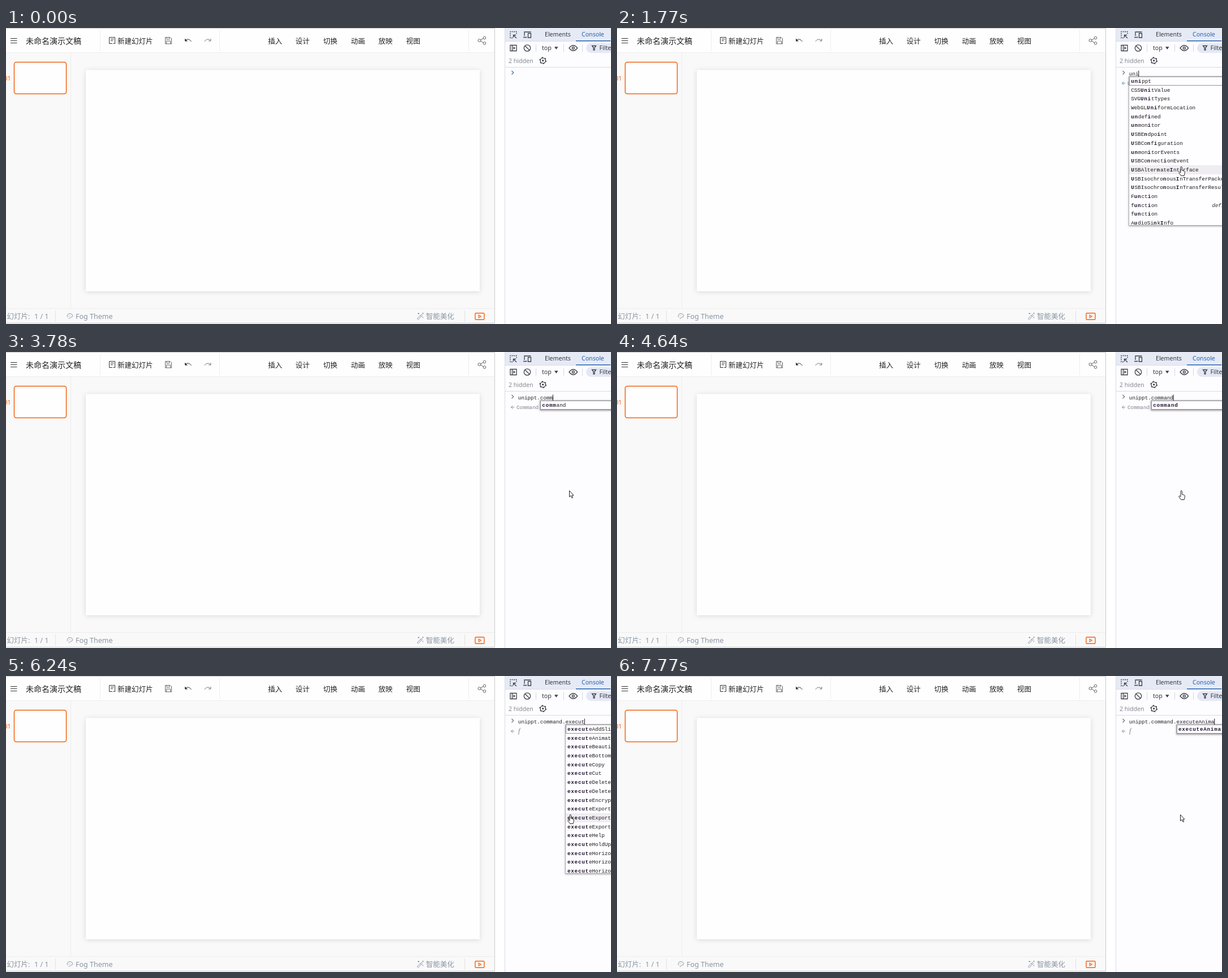
Recreate the animation shown at these times as an HTML page. Size 1069 px wide and 524 px high, loop 8 s.

```html
<!DOCTYPE html>
<html lang="zh-CN">
<head>
<meta charset="utf-8">
<title>Console typing</title>
<style>
  html, body { margin: 0; width: 100%; height: 100%; overflow: hidden; background: #fff; }
  #stage { position: relative; width: 1069px; height: 524px; overflow: hidden; }
  svg { position: absolute; left: 0; top: 0; }
  text { font-family: "Noto Sans", "Noto Sans CJK SC", "Noto Sans CJK", sans-serif; }
  .icon { fill: none; stroke: #333; stroke-width: 1; }
  .faint { stroke: #8a96a3; }
  .tool { fill: none; stroke: #3b4048; stroke-width: 1.3; }
  .menu { font-size: 12.5px; fill: #222; }
  .status { font-size: 12.5px; fill: #8a96a3; }
  .dev { font-size: 10.6px; fill: #34383f; }
  .dev .active { fill: #2560ac; }
  .dev .muted { fill: #868a92; }
  text.code, #popup { font-family: "Liberation Mono", "DejaVu Sans Mono", monospace; font-size: 9.3px; white-space: pre; }
  text.fn { font: italic 12px "Liberation Serif", serif; }
  #popup {
    position: absolute; top: 86px; width: 260px; max-height: 262.5px; overflow: hidden;
    background: #fefdff; color: #1c1c1c;
    box-shadow: 0 0 0 1px rgba(0,0,0,.1), 0 1px 3px 1px rgba(0,0,0,.34);
  }
  .row { height: 15.7px; line-height: 15.7px; padding: 1px 0 0 3px; box-sizing: border-box; position: relative; }
  .row:first-child { box-shadow: inset 0 0 0 1px #96949c; }
  .hover { background: #efedf1; }
  #popup b { color: #221430; letter-spacing: .75px; }
  #popup i { position: absolute; left: 146px; color: #333; }
  #popup kbd {
    position: absolute; left: 143px; top: 2px; width: 19px; height: 10px; border: 1px solid #c9c7cd;
    border-radius: 2px; font: 8.3px/10px "Liberation Mono", monospace; color: #85838c; text-align: center;
  }
</style>
</head>
<body>
<div id="stage">
  <svg width="1069" height="524" viewBox="0 0 1069 524">
    <defs>
      <filter id="soft" x="-5%" y="-5%" width="110%" height="110%">
        <feDropShadow dx="0" dy="1" stdDeviation="4" flood-color="#000" flood-opacity=".13"/>
      </filter>
    </defs>

    <!-- editor -->
    <path fill="#f9f9f9" d="M0 44h863v478H0z"/>
    <path fill="#fefefe" d="M0 1h863v42H0z"/>
    <path fill="none" stroke="#c9c9c9" d="M0 .5h863.5v522H0"/>
    <path fill="none" stroke="#ededed" d="M0 43.5h863M114.5 44v452M0 496.5h863M166.5 4v37M377.5 4v37M817.5 4v37"/>
    <path fill="none" stroke="#e2e2e2" d="M87.5 500v20M810.5 500v20"/>
    <rect x="141" y="74.5" width="696" height="391.5" fill="#fefefe" filter="url(#soft)"/>
    <rect x="14.5" y="60.5" width="92" height="56" rx="3.5" fill="#fefefe" stroke="#f5600f" stroke-width="1.5"/>
    <text x="-3.5" y="93" font-size="10.5" fill="#f5600f">01</text>

    <path class="icon" d="M8 18.5h11.5M8 22.5h11.5M8 26.5h11.5"/>
    <text x="35" y="28" font-size="14" fill="#222">未命名演示文稿</text>
    <path class="icon" d="M188 27.5h-5.5v-11h10V23M185 19.500h5.500M185 22.500h4M192.500 23v4.500h-3"/>
    <g class="menu">
      <text x="197" y="27.5">新建幻灯片</text>
      <text x="463" y="27.5">插入</text>
      <text x="511.5" y="27.5">设计</text>
      <text x="560.5" y="27.5">切换</text>
      <text x="609.5" y="27.5">动画</text>
      <text x="658" y="27.5">放映</text>
      <text x="707" y="27.5">视图</text>
    </g>
    <path class="icon" stroke-opacity=".75" d="M281.5 16.5h8.500l2.500 2.500v9h-11zM284 16.500v3.500h4.500v-3.500M283.500 28v-5h7v5"/>
    <path class="icon" d="M316.5 22q6-5 11 2"/>
    <path fill="#333" d="M316 18.5v5h5z"/>
    <path class="icon" stroke-opacity=".65" d="M361.500 22q-6-5-11 2M361.800 19v4h-4"/>
    <g class="icon" stroke-opacity=".75">
      <circle cx="836.5" cy="22" r="2.5"/><circle cx="845.5" cy="17.5" r="2.3"/><circle cx="845.5" cy="27" r="2.3"/>
      <path d="M838.8 21l4.5-2.500M838.8 23.200l4.5 2.600"/>
    </g>

    <g class="status">
      <text x="1.5" y="515">幻灯片:</text>
      <text x="50" y="515">1 / 1</text>
      <text x="123" y="515">Fog Theme</text>
      <text x="742" y="515">智能美化</text>
    </g>
    <g class="icon faint">
      <path d="M108.500 512c-1-4 1-7 5-6.500 4 .5 5 4 3.500 6-1 1-3-.5-3.500 1s-1 2.500-3 1.500M111 508.500h1M114 508.500h1M110.500 511h1"/>
      <path d="M726.500 514.500l7.500-7.500 1.700 1.700-7.500 7.500zM732 509l1.700 1.700M729 504v3M727.500 505.500h3M736.500 504v2.500M735.500 505h2.500M736.500 511v2.500"/>
    </g>
    <rect x="829" y="504.800" width="16" height="11.500" rx="1.500" fill="none" stroke="#f5600f" stroke-width="1.400"/>
    <path d="M835.300 508v5l4-2.500z" fill="none" stroke="#f5600f" stroke-width="1.200"/>

    <!-- developer tools -->
    <path fill="#fdfcff" d="M882 0h187v524H882z"/>
    <path fill="#e6eaf5" d="M882 0h187v23H882z"/>
    <path fill="none" stroke="#d7dcea" d="M881.500 0v524M882 23.500h187M882 69.500h187"/>
    <path fill="none" stroke="#d3d8e6" d="M936.500 29v13M985.500 29v13M1018.500 29v13"/>
    <path fill="#2b68b8" d="M1007 22h61v1.500h-61z"/>
    <path class="tool" stroke-dasharray="2 1.500" d="M895 17.500h-4v-11h11v4"/>
    <path class="tool" d="M902 18l-5-5M896.500 17v-4.500h4.500"/>
    <path class="tool" d="M916 14V7h11.500M914 16.500h6.500M922.500 9.500h5v7.500h-5z"/>
    <path class="tool" d="M891 30.500h11v10h-11zM894.500 30.500v10"/>
    <path fill="#3b4048" d="M896.500 32.800v5.400l3.500-2.700z"/>
    <circle class="tool" cx="921" cy="35.500" r="5.700"/>
    <path class="tool" d="M917 31.500l8 8"/>
    <path fill="#3b4048" d="M969 33.300h6.500l-3.200 4.700z"/>
    <path class="tool" d="M995 35.500q7.300-9.500 14.600 0-7.300 9.500-14.600 0z"/>
    <circle class="tool" cx="1002.300" cy="35.500" r="2"/>
    <rect x="1025" y="27" width="60" height="17" rx="8.500" fill="#e4e8f4"/>
    <path class="tool" d="M1035.500 31.500h7l-2.600 3.500v4h-1.800v-4z"/>
    <circle class="tool" cx="948.700" cy="57.700" r="4.600"/>
    <circle class="tool" cx="948.700" cy="57.700" r="5.700" stroke-dasharray="2.600 3.370"/>
    <circle cx="948.700" cy="57.700" r="1.600" fill="#3b4048"/>
    <g class="dev">
      <text x="952" y="15">Elements</text>
      <text x="1017" y="15" class="active">Console</text>
      <text x="947" y="39">top</text>
      <text x="1048.500" y="39">Filte</text>
      <text x="888" y="61.500" class="muted">2 hidden</text>
    </g>

    <!-- prompt -->
    <path id="chevron" fill="none" stroke-width="1.200" d="M893.500 75.800l3.300 3.200-3.300 3.200"/>
    <text id="typed" class="code" x="904.800" y="84" fill="#222"></text>
    <rect id="caret" y="75.500" width="1" height="10.500" fill="#111"/>
    <g id="preview">
      <path id="back" fill="none" d="M895.500 94.800l-3 3 3 3M892.500 97.800h5.500"/>
      <text id="result" y="101" fill="#85838c"></text>
    </g>
  </svg>

  <div id="popup"></div>

  <svg width="1069" height="524" viewBox="0 0 1069 524">
    <path id="arrow" fill="#fff" stroke="#222" d="M.500 .500V11.500L3 9.300 5 13.500 6.700 12.700 4.900 8.800H8z"/>
    <path id="hand" fill="#fff" stroke="#222" transform="translate(992 245)"
      d="M4 10.500V1.700a1.200 1.200 0 0 1 2.400 0V7l3.800 1.200q1 .3 1 1.500v2.500L10 16.500H4.600L1 11.500q-.6-1.400.6-1.700 1 0 2.400 1.500z"/>
  </svg>
</div>

<script>
const LOOP = 8000, CHAR = 5.581, TEXT_X = 904.8;
const $ = id => document.getElementById(id);
const words = s => s.split(' ');

const globals = words('unippt CSSUnitValue SVGUnitTypes WebGLUniformLocation undefined unmonitor USBEndpoint ' +
  'USBConfiguration unmonitorEvents USBConnectionEvent USBAlternateInterface USBIsochronousInTransferPacket ' +
  'USBIsochronousInTransferResult Function function function AudioSinkInfo');
const members = words('command editor events history lang layers listener pages render scale stage theme version ' +
  'constructor hasOwnProperty isPrototypeOf propertyIsEnumerable toString valueOf');
const actions = words('AddSlide Animation Beautify Bottom Copy Cut DeleteGraph DeleteSlide Encrypt ExportImage ' +
  'ExportPdf ExportPptx Help HoldUp HorizonCenter HorizonRight HorizontLeft Paste PlayStart Rotate Save SaveAs ' +
  'SelectAll SendBack SetBackground SmartArt SpaceEvenly Table VerticalAlign').map(w => 'execute' + w);

const U = 'unippt', C = 'unippt.command', E = C + '.execute';
// time, text, suggestions, pointer, result, left edge of the popup when pushed in
const steps = [
  [0, '', null, 'arrow'],
  [1440, 'u', null, 'arrow'],
  [1710, 'uni', null, 'arrow', 'Uni'],
  [1770, 'uni', globals, 'hand', 'Uni'],
  [2100, 'unip', globals, 'hand', 'Uni'],
  [2170, 'unip', globals, 'arrow', 'Uni'],
  [2300, 'unipp', globals, 'arrow', 'Uni'],
  [2360, U, globals, 'arrow', 'Uni'],
  [2630, U, globals, 'hand', 'Uni'],
  [3180, U + '.', null, 'hand', 'Command'],
  [3240, U + '.', members, 'hand', 'Command', 882.5],
  [3440, U + '.co', null, 'arrow', 'Command'],
  [3510, U + '.co', members, 'arrow', 'Command'],
  [3780, U + '.comm', members, 'arrow', 'Command'],
  [4110, U + '.comman', members, 'arrow', 'Command'],
  [4370, C, members, 'arrow', 'Command'],
  [4640, C, members, 'hand', 'Command'],
  [5170, C + '.e', null, 'hand', 'f'],
  [5230, C + '.e', actions, 'hand', 'f'],
  [5430, C + '.ex', actions, 'hand', 'f'],
  [5710, C + '.exec', actions, 'hand', 'f'],
  [5970, C + '.execu', actions, 'hand', 'f'],
  [6240, C + '.execut', actions, 'hand', 'f'],
  [6310, E, actions, 'hand', 'f'],
  [6640, E, actions, 'hand', 'f', 882.5],
  [6840, E + 'A', actions, 'hand', 'f'],
  [7170, E + 'An', actions, 'arrow', 'f'],
  [7310, E + 'Ani', actions, 'arrow', 'f'],
  [7570, E + 'Anim', actions, 'arrow', 'f'],
  [7770, E + 'Anima', actions, 'arrow', 'f']
];

// Bolds the query letters found in order; null when some are missing.
function match(word, query) {
  let n = 0, html = '';
  for (const ch of word) {
    const hit = n < query.length && ch.toLowerCase() === query[n].toLowerCase();
    if (hit) n++;
    html += hit ? `<b>${ch}</b>` : ch;
  }
  return n === query.length ? html.replaceAll('</b><b>', '') : null;
}

function showPopup(text, list, left) {
  const box = $('popup');
  box.hidden = !list;
  if (!list) return;
  const start = text.lastIndexOf('.') + 1, query = text.slice(start);
  const rows = list.map(w => match(w, query)).filter(h => h !== null);
  box.style.left = (left || TEXT_X + .4 + start * CHAR) + 'px';
  box.innerHTML = rows.map((html, i) => {
    const note = list === globals && i === 14 ? '<i>definition</i>' : '';
    const key = text === U ? '<kbd>tab</kbd>' : '';
    return `<div class="row${i === 10 ? ' hover' : ''}">${html}${note}${key}</div>`;
  }).join('');
}

function showStep([, text, list, , result = '', left]) {
  const fn = result === 'f';
  $('typed').textContent = text;
  $('caret').setAttribute('x', TEXT_X + text.length * CHAR - .3);
  $('chevron').setAttribute('stroke', text ? '#6d7686' : '#3a70b8');
  $('preview').style.display = result ? '' : 'none';
  $('back').setAttribute('stroke', result === 'Uni' ? '#4a9aa8' : '#8a8a92');
  $('result').textContent = result;
  $('result').setAttribute('class', fn ? 'fn' : 'code');
  $('result').setAttribute('x', fn ? 905 : 902);
  showPopup(text, list, left);
}

const show = (id, on) => $(id).style.display = on ? '' : 'none';

let shown = null;
function draw() {
  const t = performance.now() % LOOP;
  const step = steps.findLast(s => s[0] <= t);
  if (step !== shown) showStep(shown = step);

  // the pointer rises in hard steps, then rests
  const hop = Math.floor((t - 190) / 75.7), p = Math.min(1, Math.max(0, hop / 6));
  const ease = 1 - (1 - p) ** 2, hand = step[3] === 'hand';
  $('arrow').setAttribute('transform', `translate(${1041 - 46 * ease} ${498 - 253 * ease})`);
  show('arrow', t >= 190 && !hand);
  show('hand', hand);
  show('caret', t >= 1440 || (t >= 720 && t < 1250));
  requestAnimationFrame(draw);
}
draw();
</script>
</body>
</html>
```
